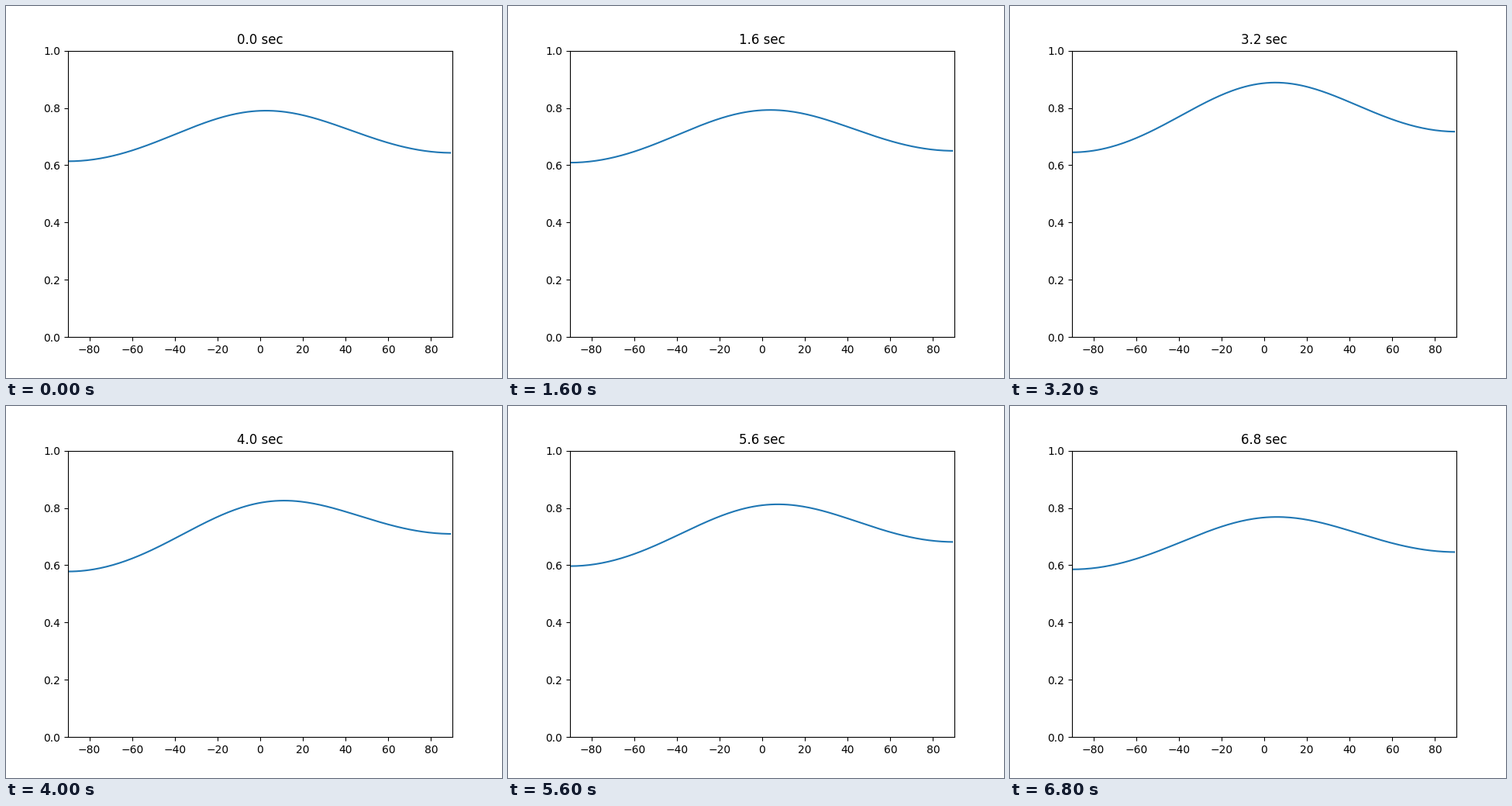
A matplotlib script that plays this animation: 640 by 480 pixels, repeating every 7 s.

```python
import numpy as np
import matplotlib.pyplot as plt
from matplotlib.animation import FuncAnimation

FRAMES, INTERVAL = 35, 200
K = 1.25  # phase shift in radians between 0 and 90 degrees

angles = np.arange(-90, 90)
s = np.sin(np.radians(angles))
dip = (1 - np.cos(K * s)) / (1 - np.cos(K))  # 0 in the middle, 1 at both ends
slant = np.sin(s) / np.sin(1)                # -1 on the left, 1 on the right


def bump(t, center, width):
    return np.exp(-((t - center) / width) ** 2)


def response(t):
    """Directional response at t seconds."""
    # two swells on a slow fade
    swell = 0.109 * bump(t, 3.1, 0.92) + 0.04 * bump(t, 5.5, 0.6) - 0.0035 * t
    # gentle sway with one strong swing to the right
    tilt = 0.0232 - 0.0085 * np.cos(np.pi * t) + 0.0825 * bump(t, 4.6, 0.864)
    depth = 0.1615 + 0.455 * swell
    return 0.79 + swell - depth * dip + tilt * slant


fig, ax = plt.subplots(figsize=(6.4, 4.8), dpi=100)
ax.set_xlim(-90, 90)
ax.set_ylim(0, 1)
line, = ax.plot(angles, response(0))
title = ax.set_title("0.0 sec")


def update(i):
    t = i * INTERVAL / 1000
    line.set_ydata(response(t))
    title.set_text(f"{t:.1f} sec")
    return line, title


anim = FuncAnimation(fig, update, frames=FRAMES, interval=INTERVAL,
                     repeat=True, repeat_delay=0)
plt.show()
```
